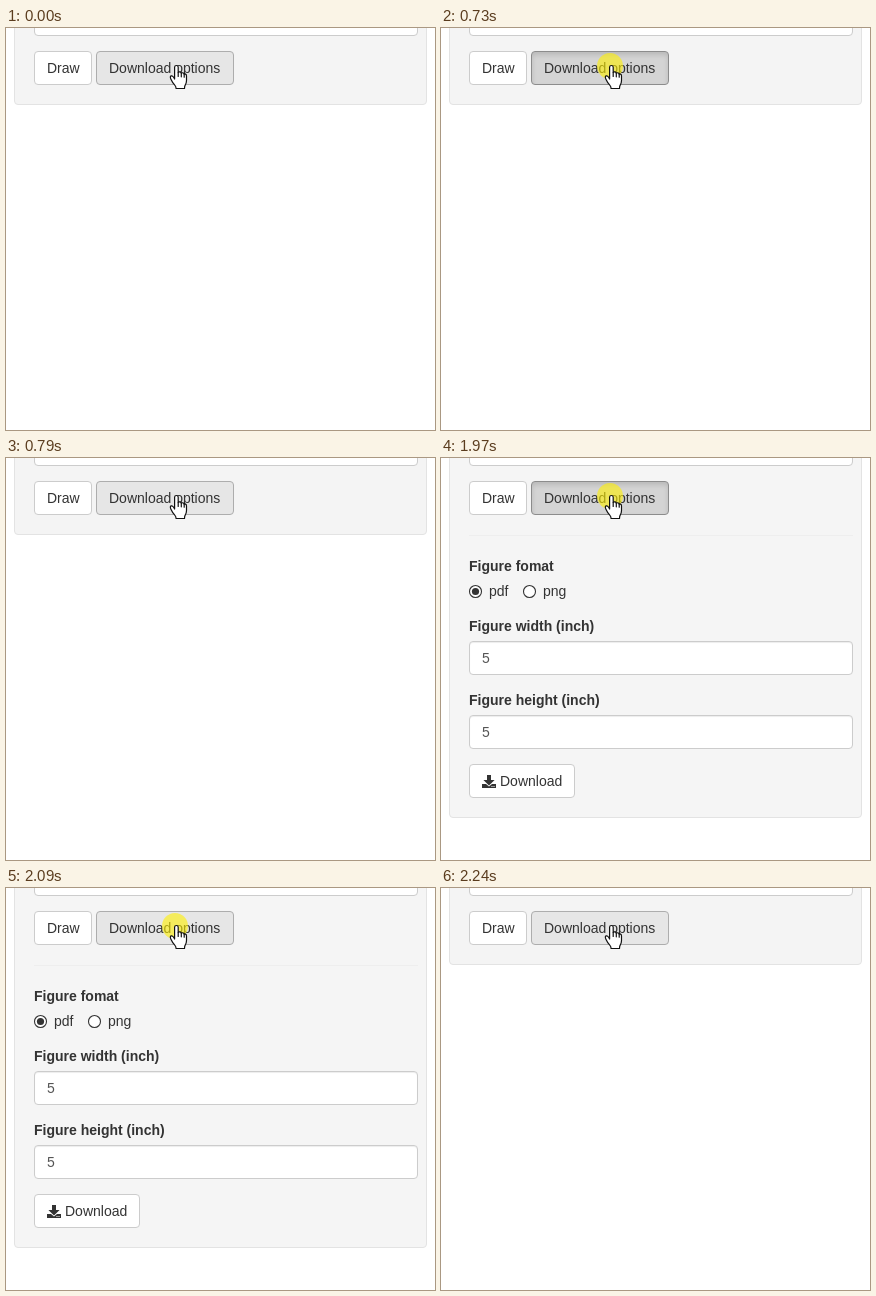
Animation, 429 px wide and 402 px high, one loop 2720 ms. Source, as an HTML page:

```html
<!DOCTYPE html>
<html lang="en">
<head>
<meta charset="utf-8">
<style>
  html, body { margin: 0; width: 100%; height: 100%; overflow: hidden; background: #fff; }
  body { position: relative; font: 14px/20px "Liberation Sans", Arial, sans-serif; color: #333; }
  body * { box-sizing: border-box; }
  .abs, .box, svg { position: absolute; white-space: nowrap; }
  .box { height: 34px; padding: 6px 12px; border: 1px solid #ccc; border-radius: 4px; background: #fff; }
  .input { left: 28px; width: 384px; color: #555; box-shadow: inset 0 1px 1px rgba(0,0,0,.075); }
  .label { left: 28px; font-weight: bold; }
  #well { left: 8px; top: -20px; width: 413px; border: 1px solid #e3e3e3; border-radius: 4px; }
  #toggle { left: 90px; top: 23px; width: 138px; background: #e6e6e6; border-color: #adadad; }
  #toggle.pressed { background: #d4d4d4; border-color: #8c8c8c; box-shadow: inset 0 3px 5px rgba(0,0,0,.125); }
  svg { left: 0; top: 0; }
</style>
</head>
<body>
<div id="well" class="abs"></div>
<div class="box input" style="top:-26px"></div>
<div class="box" style="left:28px;top:23px;width:58px">Draw</div>
<div id="toggle" class="box">Download options</div>

<div id="options">
  <div class="abs" style="left:28px;top:77px;width:384px;height:1px;background:#eee"></div>
  <div class="abs label" style="top:98px">Figure fomat</div>
  <div class="abs" style="left:48px;top:123px">pdf</div>
  <div class="abs" style="left:102px;top:123px">png</div>
  <div class="abs label" style="top:158px">Figure width (inch)</div>
  <div class="box input" style="top:183px">5</div>
  <div class="abs label" style="top:232px">Figure height (inch)</div>
  <div class="box input" style="top:257px">5</div>
  <div class="box" style="left:28px;top:306px;width:106px;padding-left:30px">Download</div>
  <svg width="429" height="402">
    <g fill="#fff" stroke="#333" stroke-width="1.1">
      <circle cx="34.5" cy="133.5" r="6"/>
      <circle cx="88.5" cy="133.5" r="6"/>
    </g>
    <circle cx="34.5" cy="133.5" r="3.6" fill="#333"/>
    <path fill="#333" d="M46 317h4v5h3.6l-5.6 5.4-5.6-5.4H46z
      M41 326h4l3 2.6 3-2.6h4v4H41z"/>
    <path fill="#fff" d="M50.5 328h1v1h-1zM52.5 328h1v1h-1z"/>
  </svg>
</div>

<svg width="429" height="402">
  <circle id="halo" cx="169" cy="38" r="13" fill="#fff000" opacity=".6"/>
  <g stroke="#111" stroke-width="1.2" stroke-linejoin="round" stroke-linecap="round">
    <path fill="#fff" d="M168.6 51V39.3q0-1.8 1.8-1.8t1.8 1.8v5.2q.5-.8 1.7-.6 1.3.2 1.4 1.3.6-.6 1.6-.4 1.2.3 1.3 1.4.5-.4 1.3-.1 1 .4 1 1.8v4.6q0 2.6-1.3 4.6-.7 1.2-.7 3.4h-8.4q0-2-1.5-3.6-2.2-2.5-3.8-6-1.1-2.4.4-3 1.3-.4 2.4 1.4z"/>
    <path fill="none" d="M172.2 44.5v4M175.3 45.2v3.6M178.2 46.2v3"/>
  </g>
</svg>

<script>
  const LOOP = 2720;
  const byId = id => document.getElementById(id);
  const [well, toggle, options, halo] = ["well", "toggle", "options", "halo"].map(byId);

  function render(now) {
    const t = now % LOOP;
    const within = (from, to) => t >= from && t < to;
    const open = within(920, 2240);
    const pressed = within(670, 740) || within(1970, 2090);
    const clicking = within(610, 790) || within(1970, 2160);

    well.style.height = (open ? 380 : 97) + "px";
    well.style.background = open ? "#f5f5f5" : "#f4f4f4";
    options.style.display = open ? "" : "none";
    toggle.classList.toggle("pressed", pressed);
    halo.style.display = clicking ? "" : "none";
  }

  const start = performance.now();
  function tick() {
    render(performance.now() - start);
    requestAnimationFrame(tick);
  }
  tick();
</script>
</body>
</html>
```
